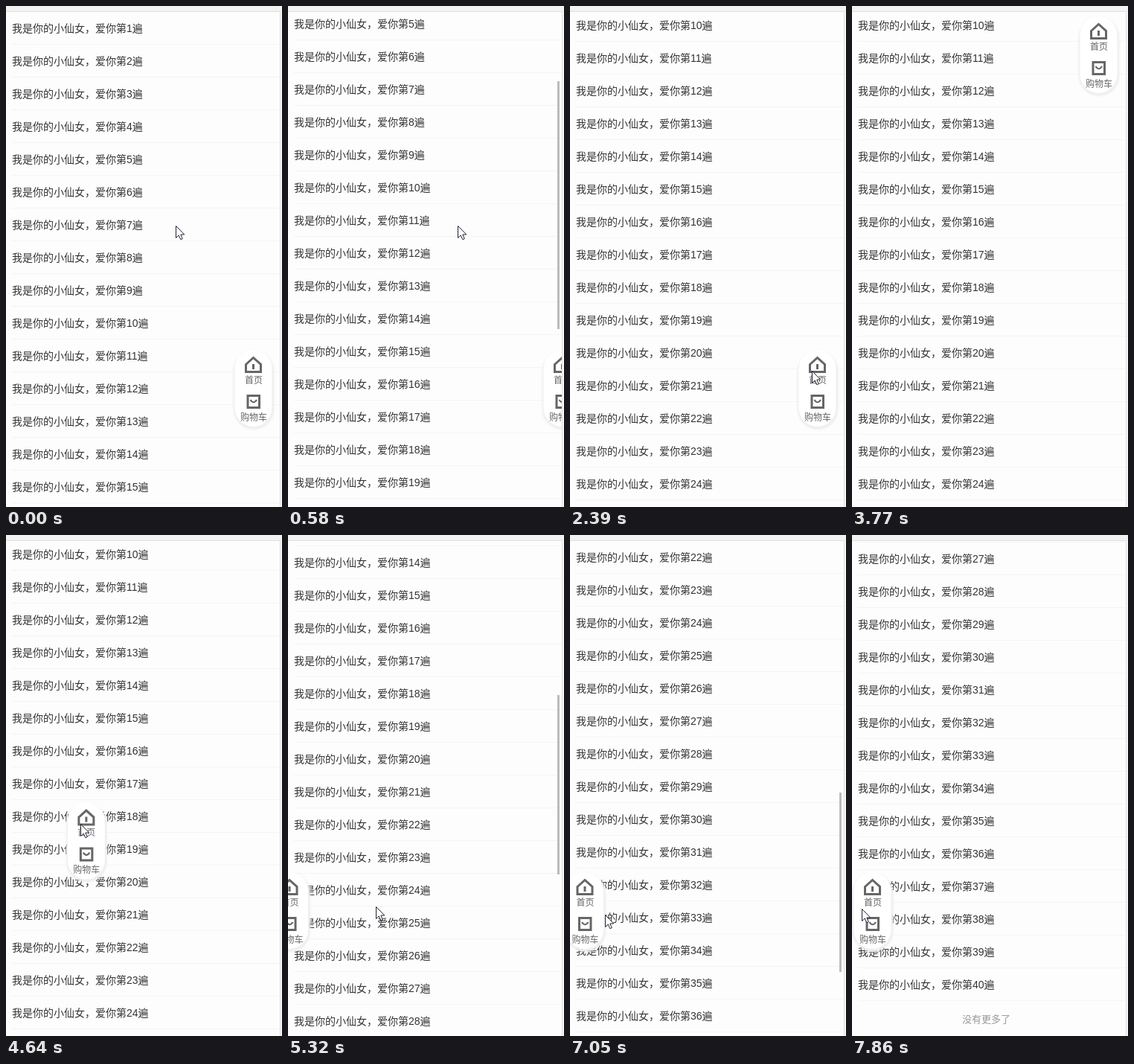
Recreate the animation shown at these times as an HTML page. Size 371x673 px, loop 8 s.

```html
<!DOCTYPE html>
<html lang="zh-CN">
<head>
<meta charset="utf-8">
<title>列表</title>
<style>
  html, body { margin: 0; width: 100%; height: 100%; overflow: hidden; background: #fdfdfd; }
  svg { display: block; width: 371px; height: 673px; }
  text { font-family: "Liberation Sans", "Noto Sans CJK SC", "Noto Sans CJK", sans-serif; }
  .row { font-size: 14px; fill: #333; }
  .end { font-size: 13px; fill: #999; text-anchor: middle; }
  .tag { font-size: 12px; fill: #666; text-anchor: middle; }
  .icon { fill: none; stroke: #666; stroke-width: 3; }
</style>
</head>
<body>
<svg viewBox="0 0 371 673">
  <defs>
    <clipPath id="view"><rect y="8" width="368" height="665"/></clipPath>
    <filter id="soft" x="-20%" y="-20%" width="140%" height="140%"><feGaussianBlur stdDeviation="0.9"/></filter>
  </defs>
  <rect width="371" height="673" fill="#fdfdfd"/>
  <g clip-path="url(#view)">
    <g id="list"></g>
    <rect id="bar" x="362" width="3" fill="#bbb"/>
    <g id="pill">
      <rect x="305.5" y="463" width="55" height="106" rx="27.5" fill="#efefef" filter="url(#soft)"/>
      <rect x="307.5" y="462" width="50" height="103" rx="25" fill="#fff"/>
      <path class="icon" d="M322.5 481.5 332.5 472.5 342.5 481.5V491.5H322.5Z"/>
      <path class="icon" stroke-width="2.5" d="M332.5 481V488"/>
      <text class="tag" x="333" y="506.5">首页</text>
      <path class="icon" d="M325 523.5H340.500V539.500H325Z"/>
      <path class="icon" style="stroke-width:2.2" d="M328.500 529Q332.700 535.500 337 529"/>
      <text class="tag" x="333" y="556.5">购物车</text>
    </g>
  </g>
  <rect width="371" height="7" fill="#f2f2f2"/>
  <rect y="7" width="369" height="1" fill="#e0e0e0"/>
  <rect x="368" y="7" width="1" height="666" fill="#dedede"/>
  <rect x="369" y="7" width="2" height="666" fill="#f7f7f7"/>
  <path id="cursor" d="M.5.5V16.500L4.200 13 6.800 18.700 9.300 17.600 6.800 12H11.800Z" fill="#fff" stroke="#223" stroke-width="1"/>
</svg>
<script>
const LOOP = 8000, ROW = 44, ROWS = 40;
const $ = id => document.getElementById(id);
const list = $('list'), bar = $('bar'), pill = $('pill'), cursor = $('cursor');

let rows = '';
for (let i = 0; i < ROWS; i++) {
  const y = i * ROW;
  rows += `<text class="row" x="8" y="${y + 35}">我是你的小仙女，爱你第${i + 1}遍</text>` +
    `<rect x="8" y="${y + 51}" width="360" height="1" fill="#f4f4f4"/>`;
}
list.innerHTML = rows + `<text class="end" x="180.5" y="${ROWS * ROW + 37}">没有更多了</text>`;

// screen updates: start, end, steps
const BURSTS = [
  [270, 740, 4], [1040, 1460, 4], [1890, 2840, 8], [2960, 3920, 8], [4070, 5020, 8],
  [5170, 5590, 4], [5960, 6470, 5], [6780, 7740, 8], [7860, 7860, 1]
];
const SLACK = 14;

// keys: time, then values
const SCROLL = [
  [180, 0], [270, 30], [427, 120], [583, 182], [740, 200],
  [960, 200], [1180, 300], [1320, 375], [1460, 400],
  [5110, 400], [5170, 440], [5310, 565], [5450, 790], [5590, 900],
  [7020, 900], [7054, 924], [7191, 1060], [7328, 1142]
];
const FADE = [
  [200, 0], [270, 1], [1800, 1], [2100, 0], [5100, 0], [5170, 1],
  [5900, 1], [6200, 0], [7000, 0], [7054, 1], [7700, 1], [7860, 0]
];
const PILL = [
  [200, 0, 0], [583, 36, 0], [1800, 36, 0], [2161, 0, 0], [2400, 0, 0],
  [2840, -80, -252], [3500, -1, -448], [4206, -1, -448], [4750, -300, 14],
  [5020, -305, -9], [5130, -305, -9], [5310, -330.5, -9], [5450, -341, -9],
  [5860, -341, -9], [6225, -305, -9], [7020, -305, -9], [7054, -312.5, -9],
  [7300, -341, -9], [7560, -341, -9], [7860, -305, -9]
];
const CURSOR = [
  [900, 228, 295], [1040, 228, 297], [1800, 228, 297], [2297, 325, 490], [2400, 325, 490],
  [2840, 245, 238], [3500, 324, 42], [3640, 324, -30], [4070, 324, -30], [4206, 324, 42],
  [4750, 25, 504], [5020, 118, 499], [5900, 118, 499], [6470, 80, 508],
  [6700, 80, 508], [7054, 47, 510], [7860, 13, 502]
];

function snap(t) {
  let at = 0;
  for (const [a, b, n] of BURSTS) {
    if (t < a - SLACK) break;
    const step = (b - a) / (n - 1) || 1;
    at = a + Math.min(n - 1, Math.floor((t - a + SLACK) / step)) * step;
  }
  return at;
}

function sample(keys, t) {
  const i = keys.findIndex(k => k[0] > t);
  if (i === 0) return keys[0].slice(1);
  if (i < 0) return keys[keys.length - 1].slice(1);
  const a = keys[i - 1], b = keys[i], p = (t - a[0]) / (b[0] - a[0]);
  return a.slice(1).map((v, j) => v + (b[j + 1] - v) * p);
}

const move = (el, x, y) => el.setAttribute('transform', `translate(${x} ${y})`);

function draw(time) {
  const t = snap(time);
  const s = Math.round(sample(SCROLL, t)[0]);
  const ratio = s < 350 ? 0.5 : 0.3635; // the list grows once more rows load
  move(list, 0, -s);
  bar.setAttribute('y', Math.round(10 + s * ratio));
  bar.setAttribute('height', s < 350 ? 333 : 241);
  bar.setAttribute('opacity', sample(FADE, t)[0]);
  move(pill, ...sample(PILL, t));
  move(cursor, ...sample(CURSOR, t).map(Math.round));
}

const start = performance.now();
function tick(now) {
  draw(Math.max(0, now - start) % LOOP);
  requestAnimationFrame(tick);
}
draw(0);
requestAnimationFrame(tick);
</script>
</body>
</html>
```
